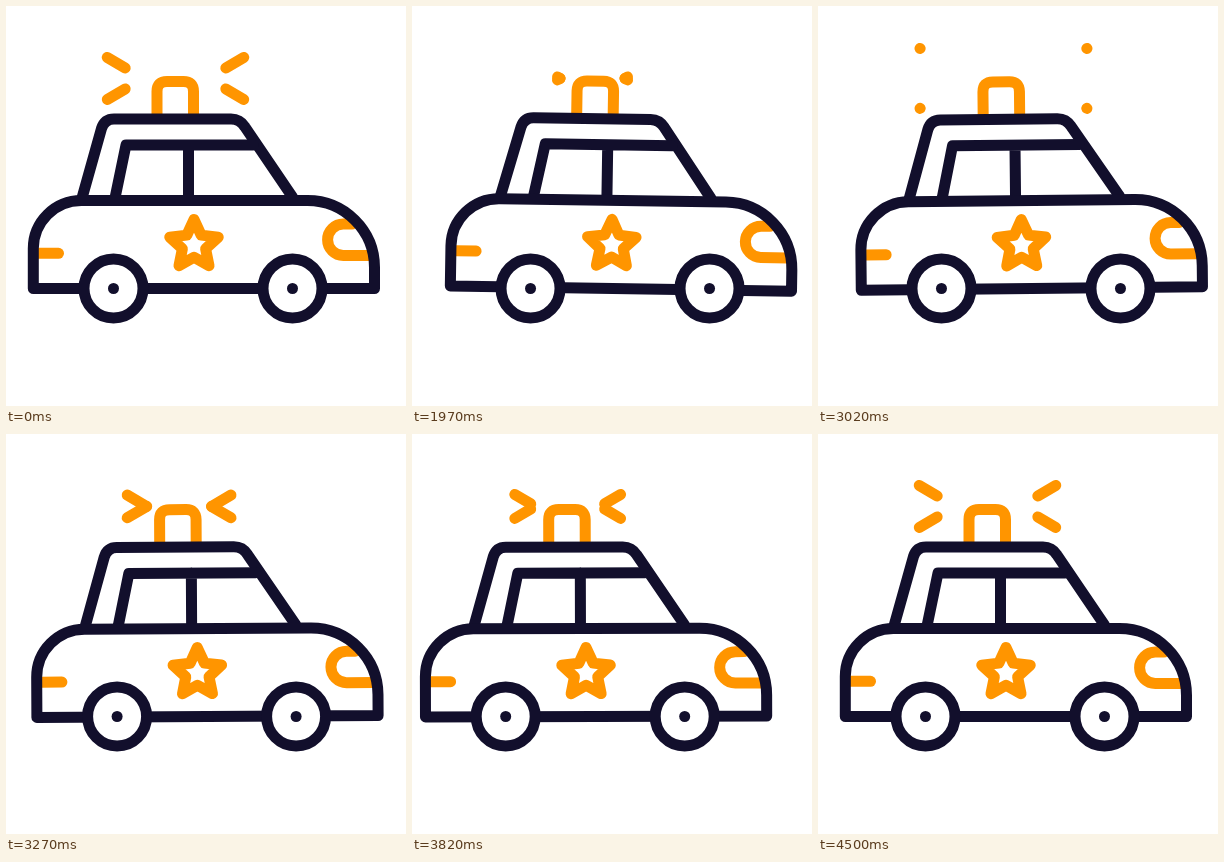
Animation, 400 px wide and 400 px high, one loop 4520 ms. Source, as an HTML page:

```html
<!DOCTYPE html>
<html lang="en">
<head>
<meta charset="utf-8">
<title>Patrol car</title>
<style>
  html, body { margin: 0; width: 100%; height: 100%; overflow: hidden; background: #fff; }
  svg { display: block; width: 100vw; height: 100vh; }
  path, line, circle { fill: none; stroke-width: 11; stroke-linecap: round; stroke-linejoin: round; }
  .dark { stroke: #120f2c; }
  .warm { stroke: #ff9500; }
  .wheel { fill: #fff; }
  .hub { fill: #120f2c; }
</style>
</head>
<body>
<svg viewBox="0 0 400 400">
  <g id="car">
    <g id="rays" class="warm"></g>
    <g id="body">
      <g class="warm">
        <path d="M151 108V85.5Q151 75.5 161 75.5H177.5Q187.5 75.5 187.5 85.5V108"/>
        <path d="M32 247.3H52.5"/>
        <path d="M346 218H337.3A15.7 15.7 0 0 0 337.3 249.4H364" stroke-linecap="butt"/>
        <path id="star"/>
      </g>
      <g class="dark">
        <path d="M76 192L95.5 122.5Q98.500 113 108 113H225Q234 113 239 121L286.500 191"/>
        <path d="M109 192L120 139H247M182.500 139V192"/>
        <path d="M27.300 282.500V242.500A48 48 0 0 1 75.300 194.500H301.500A67 67 0 0 1 368.500 261.500V282.500Z"/>
      </g>
    </g>
    <g class="dark">
      <circle class="wheel" cx="107.500" cy="282.500" r="29.500"/>
      <circle class="wheel" cx="286.500" cy="282.500" r="29.500"/>
    </g>
    <circle class="hub" cx="107.500" cy="282.500" r="5.500"/>
    <circle class="hub" cx="286.500" cy="282.500" r="5.500"/>
  </g>
</svg>
<script>
  const LOOP = 4520, START = 1520, END = 4500;
  const $ = id => document.getElementById(id);
  const clamp = v => Math.min(1, Math.max(0, v));
  const mix = (a, b, t) => a + (b - a) * t;
  const inOut = t => (1 - Math.cos(Math.PI * clamp(t))) / 2;
  const sineOut = t => Math.sin(Math.PI / 2 * clamp(t));
  const cubicOut = t => 1 - (1 - clamp(t)) ** 3;

  // Sideways drift of the car: time, offset
  const drift = [
    [START, 0], [2020, 12], [2470, 18], [2740, 18.8], [3020, 16], [3120, 12],
    [3520, -10], [3670, -14], [3760, -14.7], [4120, -8], [4220, -5], [END, 0]
  ];

  function slope(i) {
    const a = drift[Math.max(0, i - 1)], b = drift[Math.min(drift.length - 1, i + 1)];
    return (b[1] - a[1]) / (b[0] - a[0]);
  }

  function driftAt(t) {
    if (t <= START || t >= END) return 0;
    const i = drift.findIndex(p => p[0] > t) - 1;
    const [t0, x0] = drift[i], [t1, x1] = drift[i + 1];
    const d = t1 - t0, u = (t - t0) / d, v = 1 - u;
    return x0 * (1 + 2 * u) * v * v + slope(i) * d * u * v * v
         + x1 * u * u * (3 - 2 * u) - slope(i + 1) * d * u * u * v;
  }

  // Rocking of the body, in degrees
  const SWING = 385, SWINGS = 7.5;
  function tiltAt(t) {
    const n = (t - START) / SWING;
    return n > 0 && n < SWINGS ? Math.sin(2 * Math.PI * n) : 0;
  }

  // Visible part of each ray: 0 is next to the beacon, 1 is farthest out
  const REST = [0.35, 0.7], FIRST = 1890, PULSE = 570, LAST = FIRST + 3 * PULSE;
  function rayAt(t) {
    if (t <= START || t >= END) return REST;
    if (t < FIRST) {
      const e = inOut((t - START) / (FIRST - START));
      return REST.map(r => mix(r, 1, e));
    }
    if (t < LAST) {
      const p = (t - FIRST) % PULSE / PULSE;
      return [inOut((p - 0.525) / 0.475), inOut(p)];
    }
    const p = (t - LAST) / (END - LAST);
    return [REST[0] * sineOut((p - 0.1) / 0.9), REST[1] * cubicOut(p)];
  }

  const starPoints = Array.from({ length: 10 }, (_, i) => {
    const r = i % 2 ? 12.2 : 25.5, a = Math.PI * (i / 5 - 0.5);
    return `${188 + r * Math.cos(a)} ${239 + r * Math.sin(a)}`;
  });
  $('star').setAttribute('d', `M${starPoints.join('L')}Z`);

  const rays = [[-1, -1], [-1, 1], [1, -1], [1, 1]].map(([sx, sy]) => {
    const el = document.createElementNS('http://www.w3.org/2000/svg', 'path');
    $('rays').append(el);
    return { el, at: k => `${169.5 + sx * (32.5 + 51 * k)} ${72.4 + sy * 30 * k}` };
  });

  function draw(t) {
    $('car').setAttribute('transform', `translate(${driftAt(t)} 0)`);
    $('body').setAttribute('transform', `rotate(${tiltAt(t)} 197 282.5)`);
    const [from, to] = rayAt(t);
    for (const { el, at } of rays) el.setAttribute('d', `M${at(from)}L${at(to)}`);
  }

  const begin = performance.now();
  function tick() {
    draw((performance.now() - begin) % LOOP);
    requestAnimationFrame(tick);
  }
  tick();
</script>
</body>
</html>
```
